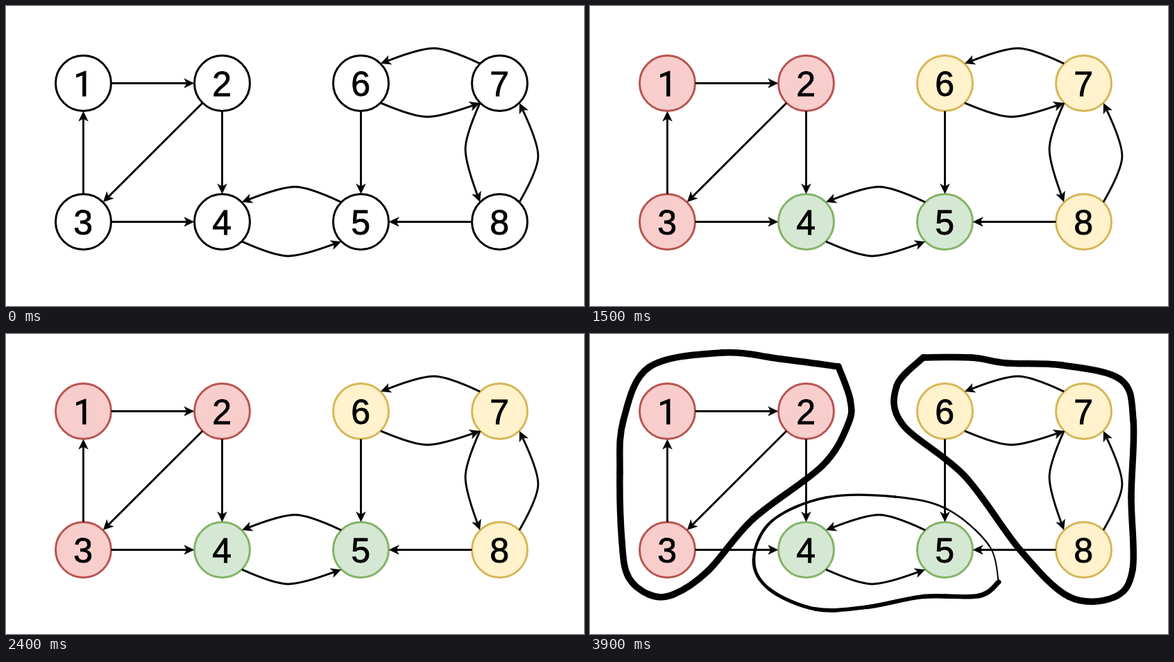
Recreate the animation shown at these times as an HTML page. Size 833 by 433 pixels, loop 4500 ms.

```html
<!DOCTYPE html>
<html lang="en">
<head>
<meta charset="utf-8">
<title>Strongly connected components</title>
<style>
  html, body { margin: 0; width: 100%; height: 100%; overflow: hidden; background: #fff; }
  svg { display: block; }
  circle { stroke-width: 3; }
  path { fill: none; stroke: #000; stroke-linecap: round; }
  #edges path { stroke-width: 2.9; stroke-linecap: butt; }
  marker path { fill: #000; stroke: none; }
  text { font: 50px "Liberation Sans", Arial, sans-serif; text-anchor: middle; stroke: #000; stroke-width: .8; }
  text.one { font-family: Roboto, sans-serif; }
</style>
</head>
<body>
<svg width="833" height="433" viewBox="0 0 833 433">
  <marker id="arrow" markerUnits="userSpaceOnUse" markerWidth="18" markerHeight="18"
          refX="4" refY="8" orient="auto" overflow="visible">
    <path d="M15 8 L0 .7 L4 8 L0 15.3 Z"/>
  </marker>
  <g id="nodes"></g>
  <g id="edges"></g>
  <g id="outlines"></g>
</svg>
<script>
const STEP = 1500, SPACING = 200, ORIGIN = 111.5, RADIUS = 40;
const rows = ['1267', '3458'];
const plain = { fill: '#fff', stroke: '#000' };
const components = {
  123: { fill: '#f8cecc', stroke: '#b85450' },
  45: { fill: '#d5e8d4', stroke: '#82b366' },
  678: { fill: '#fff2cc', stroke: '#d6b656' }
};

// From-node and to-node, then how far the edge bows to its right
const edges = '12 31 23 24 34 65 85 76:22 67:20 78:21 87:27 54:22 45:21';

// Hand-drawn loops: width at the start and end of the stroke, key points
const outlines = [
  [9.5, 9.5, '358,47 275,36 190,27 85,48 48,125 43,200 46,300 55,350 85,376 120,376 170,342 235,267 335,190 372,130 375,95 358,47'],
  [9.5, 9.5, '480,34 550,34 600,42 680,45 765,66 783,125 780,235 782,340 755,380 690,379 620,312 540,205 450,130 442,75 480,34'],
  [7, 2, '589,358 560,378 480,379 400,394 325,397 258,368 236,325 262,270 340,236 440,235 515,253 575,305 589,358']
];

const $ = id => document.getElementById(id);

function set(el, attrs) {
  for (const key in attrs) el.setAttribute(key, attrs[key]);
  return el;
}

function add(parent, tag, attrs) {
  const el = document.createElementNS('http://www.w3.org/2000/svg', tag);
  return $(parent).appendChild(set(el, attrs));
}

const nodes = {};
rows.forEach((row, j) => [...row].forEach((name, i) => {
  const x = ORIGIN + SPACING * i, y = ORIGIN + SPACING * j;
  const circle = add('nodes', 'circle', { cx: x, cy: y, r: RADIUS });
  add('nodes', 'text', { x: x - .3, y: y + 18.5, class: name === '1' ? 'one' : '' }).textContent = name;
  const group = Object.keys(components).find(names => names.includes(name));
  nodes[name] = { x, y, circle, colors: components[group] };
}));

function drawEdge(spec) {
  const [ends, bow = 0] = spec.split(':');
  const a = nodes[ends[0]], b = nodes[ends[1]];
  const dist = Math.hypot(b.x - a.x, b.y - a.y);
  const ux = (b.x - a.x) / dist, uy = (b.y - a.y) / dist;
  // Point given by its distance along the edge and to the right of it
  const at = (along, side) => [a.x + ux * along - uy * side, a.y + uy * along + ux * side];

  // Bowed edges leave and enter the circles at 45 degrees
  const inset = (RADIUS + .2) * (bow ? Math.SQRT1_2 : 1);
  const side = bow ? inset : 0, outer = side + +bow;
  const span = dist - 2 * inset;
  const first = inset + span * .33, second = inset + span * .6;
  const tipAlong = dist - inset - second;
  const back = 11 / Math.hypot(tipAlong, +bow);
  const start = at(inset, side), middle = at((first + second) / 2, outer);
  const end = at(dist - inset - tipAlong * back, side + bow * back);
  add('edges', 'path', {
    d: `M${start}Q${at(first, outer)} ${middle}Q${at(second, outer)} ${end}`,
    'marker-end': 'url(#arrow)'
  });
}
edges.split(' ').forEach(drawEdge);

// Catmull-Rom spline, one Bézier per segment so that the width can taper
function drawOutline([from, to, points]) {
  const p = points.split(' ').map(s => s.split(',').map(Number));
  const last = p.length - 1;
  for (let i = 0; i < last; i++) {
    const a = p[i - 1] || p[i], b = p[i], c = p[i + 1], e = p[i + 2] || c;
    const c1 = b.map((v, k) => v + (c[k] - a[k]) / 6);
    const c2 = c.map((v, k) => v - (e[k] - b[k]) / 6);
    add('outlines', 'path', {
      d: `M${b}C${c1} ${c2} ${c}`,
      'stroke-width': from + (to - from) * i / (last - 1)
    });
  }
}
outlines.forEach(drawOutline);

function draw() {
  const stage = Math.floor(performance.now() / STEP) % 3;
  for (const { circle, colors } of Object.values(nodes)) set(circle, stage ? colors : plain);
  $('outlines').style.display = stage === 2 ? '' : 'none';
  requestAnimationFrame(draw);
}
draw();
</script>
</body>
</html>
```
